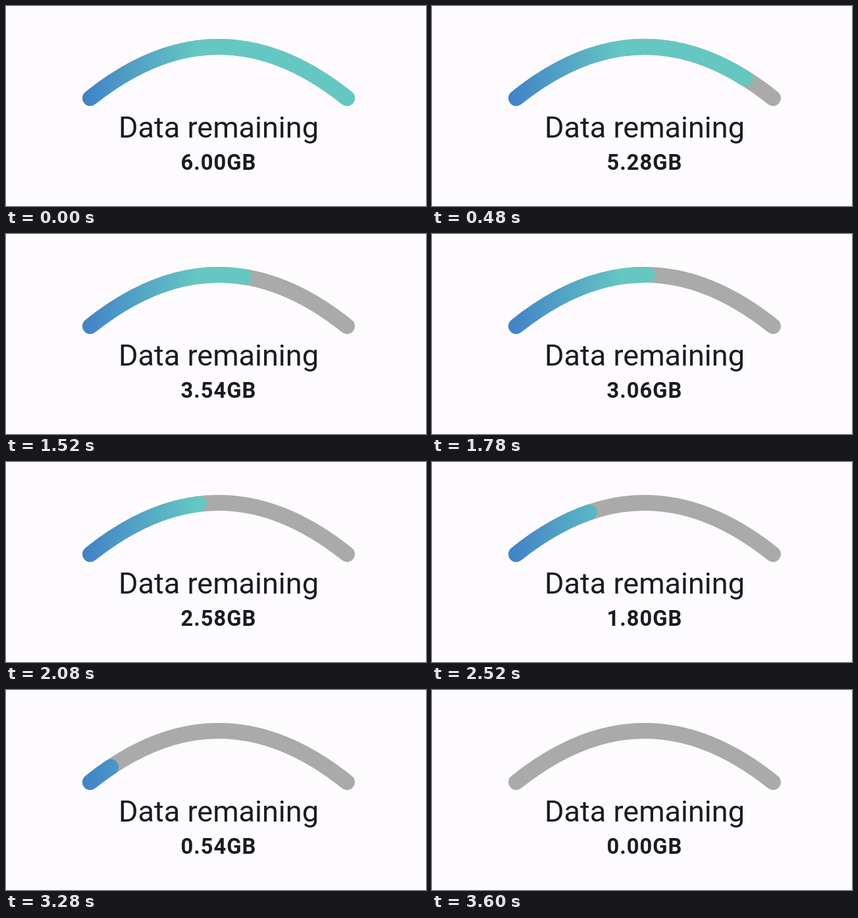
Recreate the animation shown at these times as an HTML page. Size 638x304 px, loop 3.66 s.

```html
<!DOCTYPE html>
<html lang="en">
<head>
<meta charset="utf-8">
<title>Data remaining</title>
<style>
  html, body { margin: 0; width: 100%; height: 100%; overflow: hidden; background: #fefbff; }
  svg { display: block; width: 638px; height: 304px; }
  path { fill: none; stroke-width: 24; stroke-linecap: round; }
  text { font-family: Roboto, sans-serif; fill: #1c1b1f; text-anchor: middle; }
  .title { font-size: 45px; }
  .amount { font-size: 32.7px; font-weight: 700; letter-spacing: 1.02px; }
</style>
</head>
<body>
<svg viewBox="0 0 638 304">
  <defs>
    <linearGradient id="fill" gradientUnits="userSpaceOnUse" x1="122" y1="140" x2="290" y2="140">
      <stop offset="0" stop-color="#4284c8"/>
      <stop offset="1" stop-color="#65c7c2"/>
    </linearGradient>
  </defs>
  <path d="M128 140Q323 -16 518 140" stroke="#aaa"/>
  <path id="bar" d="M128 140Q323 -16 518 140" stroke="url(#fill)" pathLength="100"/>
  <text class="title" x="323" y="200">Data remaining</text>
  <text class="amount" id="amount" x="323" y="248.5">6.00GB</text>
</svg>
<script>
  const LOOP = 3660, HOLD = 120, START = 36, STEP = 35.4;
  const TOTAL_GB = 6;
  const bar = document.getElementById('bar');
  const amount = document.getElementById('amount');

  function percentAt(t) {
    if (t < HOLD) return 100;
    return Math.max(0, 100 - Math.floor((t - START) / STEP));
  }

  function draw() {
    const percent = percentAt(performance.now() % LOOP);
    bar.style.visibility = percent ? 'visible' : 'hidden';
    bar.style.strokeDasharray = percent < 100 ? `${percent} 200` : 'none';
    amount.textContent = (TOTAL_GB * percent / 100).toFixed(2) + 'GB';
    requestAnimationFrame(draw);
  }
  draw();
</script>
</body>
</html>
```
